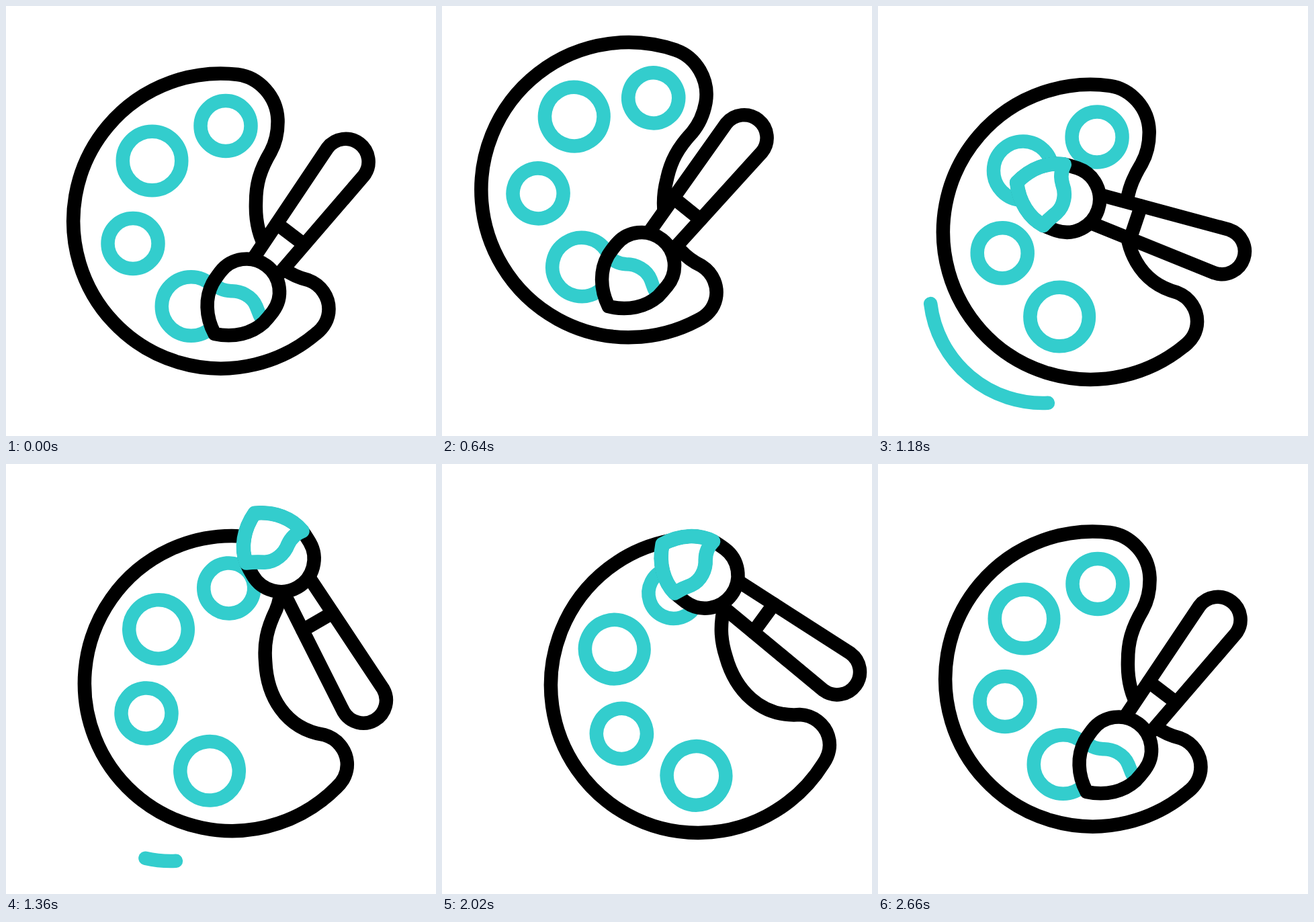
Write an HTML page that moves like this. It is 640x640 px and loops after 2.8 s.

```html
<!DOCTYPE html>
<html lang="en">
<head>
<meta charset="utf-8">
<title>Palette and brush</title>
<style>
  html, body { margin: 0; width: 100%; height: 100%; overflow: hidden; background: #fff; }
  svg {
    display: block; width: 100vw; height: 100vh;
    fill: none; stroke-width: 20.5; stroke-linecap: round; stroke-linejoin: round;
  }
  .ink { stroke: #000; }
  .paint { stroke: #33cdcd; }
  .solid { fill: #fff; }
  #wet { stroke-width: 21.5; }
</style>
</head>
<body>
<svg viewBox="0 0 640 640">
  <defs>
    <path id="bristle" d="M0 78.5 C-27 66 -44 44 -48 20 Q-49 12 -49 0
      A49 49 0 0 1 49 0 Q49 12 48 21 C44 44 27 66 0 78.5 Z"/>
  </defs>
  <path id="trail" class="paint"/>
  <g id="palette">
    <path class="ink solid" d="M25 -218 C56 -214 83 -186 84.5 -151 C85 -134 82 -118 74 -103
      C58 -76 52 -55 52 -28 C50 22 72 74 130 88 C149 95 160.5 113 160.5 131
      C160.5 146 153 159 141 168 A219.5 219.5 0 1 1 25 -218 Z"/>
    <g class="paint">
      <circle cx="-102.5" cy="-89.5" r="43.75"/>
      <circle cx="7" cy="-141.5" r="37.5"/>
      <circle cx="-131" cy="33.5" r="37.5"/>
      <circle cx="-44.5" cy="127" r="43.75"/>
    </g>
  </g>
  <g id="brush">
    <path class="ink solid" d="M-22 -44 L-34 -243.5 A34 34 0 0 1 34 -243.5 L22 -44 Z"/>
    <path class="ink" d="M-25.7 -108 H25.7"/>
    <use href="#bristle" class="solid"/>
    <path class="paint" d="M-48 20 C-36 22 -26 18 -19 13 C-8 4 10 0 24 8 Q36 16 48 21"/>
    <use href="#bristle" class="ink"/>
    <path id="wet" class="paint" d="M-48 20 C-36 22 -26 18 -19 13 C-8 4 10 0 24 8 Q36 16 48 21
      C44 44 27 66 0 78.5 C-27 66 -44 44 -48 20 Z"/>
  </g>
</svg>
<script>
const LOOP = 2800, STEP = 20;
const [trail, palette, brush, wet] =
  ['trail', 'palette', 'brush', 'wet'].map(id => document.getElementById(id));

// Eased progress from 0 to 1 between two times.
function ease(t, start, end) {
  const u = Math.min(1, Math.max(0, (t - start) / (end - start)));
  return u * u * (3 - 2 * u);
}

// Adds up eased moves, each given as [start, end, amount].
const sway = (t, base, ...moves) =>
  moves.reduce((sum, [start, end, by]) => sum + by * ease(t, start, end), base);

function place(el, x, y, deg) {
  el.setAttribute('transform', `translate(${x} ${y}) rotate(${deg})`);
}

function drawPalette(t) {
  const turn = sway(t, 0, [160, 600, 12.2], [600, 2000, -30.2], [2000, 2460, 18]);
  const y = sway(t, 320, [160, 540, -56], [540, 1000, 80], [1000, 1400, -18],
    [1400, 1900, 15.5], [1900, 2120, -21.5]);
  place(palette, 320 - 3.45 * turn, y, turn); // rolls sideways as it tilts
}

function drawBrush(t) {
  const x = sway(t, 358, [160, 940, -91], [1120, 1490, 199], [1750, 2260, -137], [2260, 2660, 29]);
  const y = sway(t, 425.5, [160, 540, -45.5], [540, 950, 40], [950, 1460, -310],
    [1460, 1780, 15], [1900, 2420, 300.5]);
  const turn = sway(t, 37.3, [160, 640, 1.5], [850, 1430, 115.7], [1780, 2530, -117.2]);
  place(brush, x, y, turn);
  wet.setAttribute('opacity', sway(t, 0, [820, 920, 1], [2340, 2460, -1]));
}

// A swipe below the palette whose tail chases its head along one arc.
function drawTrail(t) {
  const point = progress => {
    const a = (181 - 93.7 * progress) * Math.PI / 180;
    return `${245 + 168 * Math.cos(a)} ${423 + 168 * Math.sin(a)}`;
  };
  const head = ease(t, 754, 1074), tail = ease(t, 1123, 1443);
  trail.setAttribute('d', head > tail ? `M${point(tail)} A168 168 0 0 0 ${point(head)}` : '');
}

function tick() {
  const t = Math.floor(performance.now() % LOOP / STEP) * STEP;
  drawPalette(t);
  drawBrush(t);
  drawTrail(t);
  requestAnimationFrame(tick);
}
tick();
</script>
</body>
</html>
```
